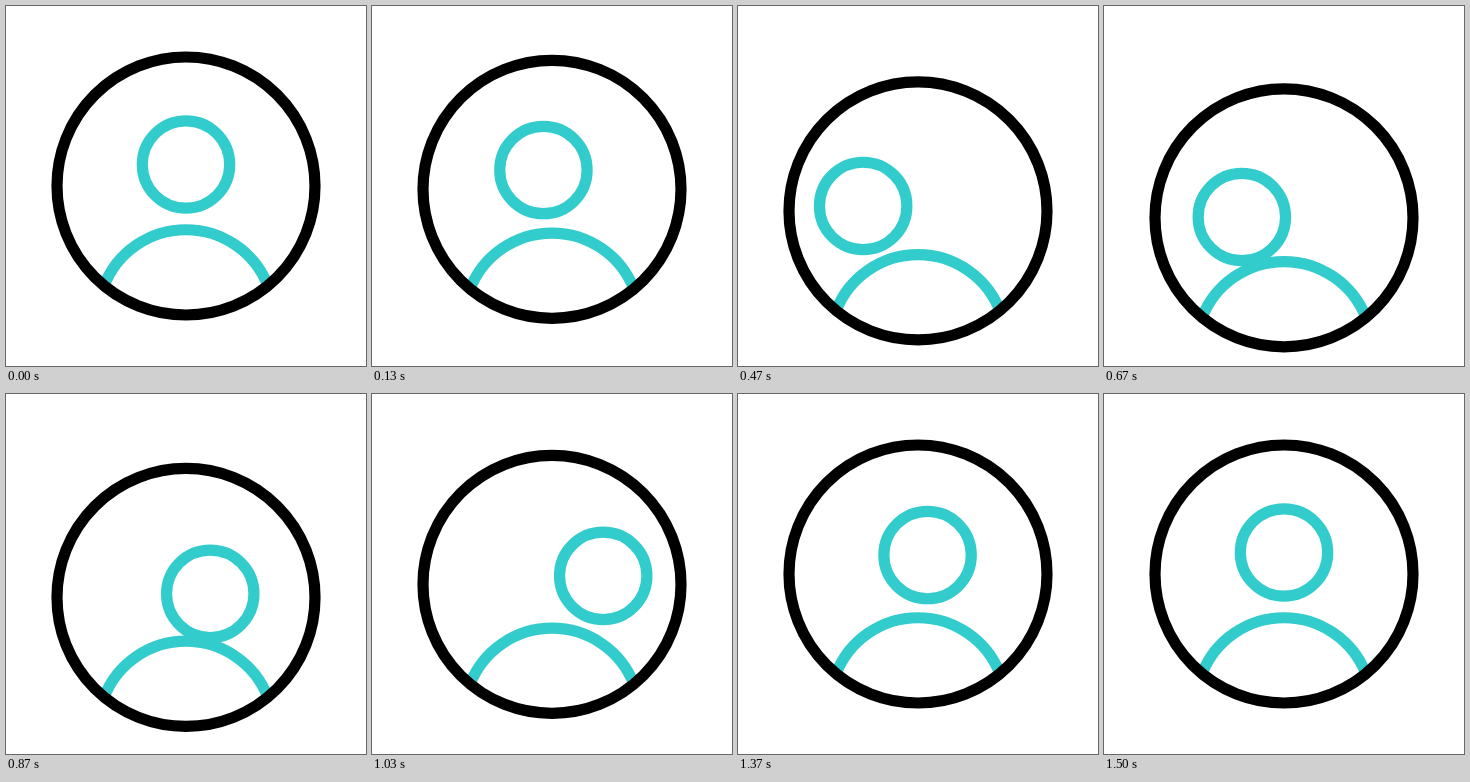
Recreate the animation shown at these times as an HTML page. Size 360 by 360 pixels, loop 2 s.

```html
<!DOCTYPE html>
<html lang="en">
<head>
<meta charset="utf-8">
<title>Profile icon</title>
<style>
  html, body { margin: 0; height: 100%; overflow: hidden; background: #fff; }
  svg { display: block; width: 100vw; height: 100vh; fill: none; stroke-width: 11.2; }
</style>
</head>
<body>
<svg viewBox="0 0 360 360">
  <g id="badge">
    <g stroke="#33cccc">
      <circle id="head" cx="180" cy="158.5" r="43.7"/>
      <path d="M98 280A87.9 87.9 0 0 1 262 280"/>
    </g>
    <circle cx="180" cy="180" r="129" stroke="#000"/>
  </g>
</svg>
<script>
const LOOP = 2000, LAST_STEP = 45;
const badge = document.getElementById('badge');
const head = document.getElementById('head');

// Keys are [step, value], thirty steps per second.
const bounce = [[0, 0], [20, 31.8], [37.8, 0]];
const sway = [[0, 0], [16.6, -58.7], [30.5, 51.4], [45, 0]];
const dip = [[0, 0], [19.7, 20.7], [47, 0]];

function valueAt(keys, step) {
  for (let i = 1; i < keys.length; i++) {
    const [s0, v0] = keys[i - 1], [s1, v1] = keys[i];
    if (step < s1) {
      const p = (step - s0) / (s1 - s0);
      return v0 + (v1 - v0) * p * p * (3 - 2 * p);
    }
  }
  return keys[keys.length - 1][1];
}

function draw(time) {
  const tick = Math.floor(time % LOOP / 10);
  let step = Math.floor((3 * tick + 1) / 10);
  if (step >= LAST_STEP) step = 0;
  badge.setAttribute('transform', `translate(0 ${valueAt(bounce, step)})`);
  head.setAttribute('transform', `translate(${valueAt(sway, step)} ${valueAt(dip, step)})`);
}

const start = performance.now();
function loop() {
  draw(performance.now() - start);
  requestAnimationFrame(loop);
}
loop();
</script>
</body>
</html>
```
